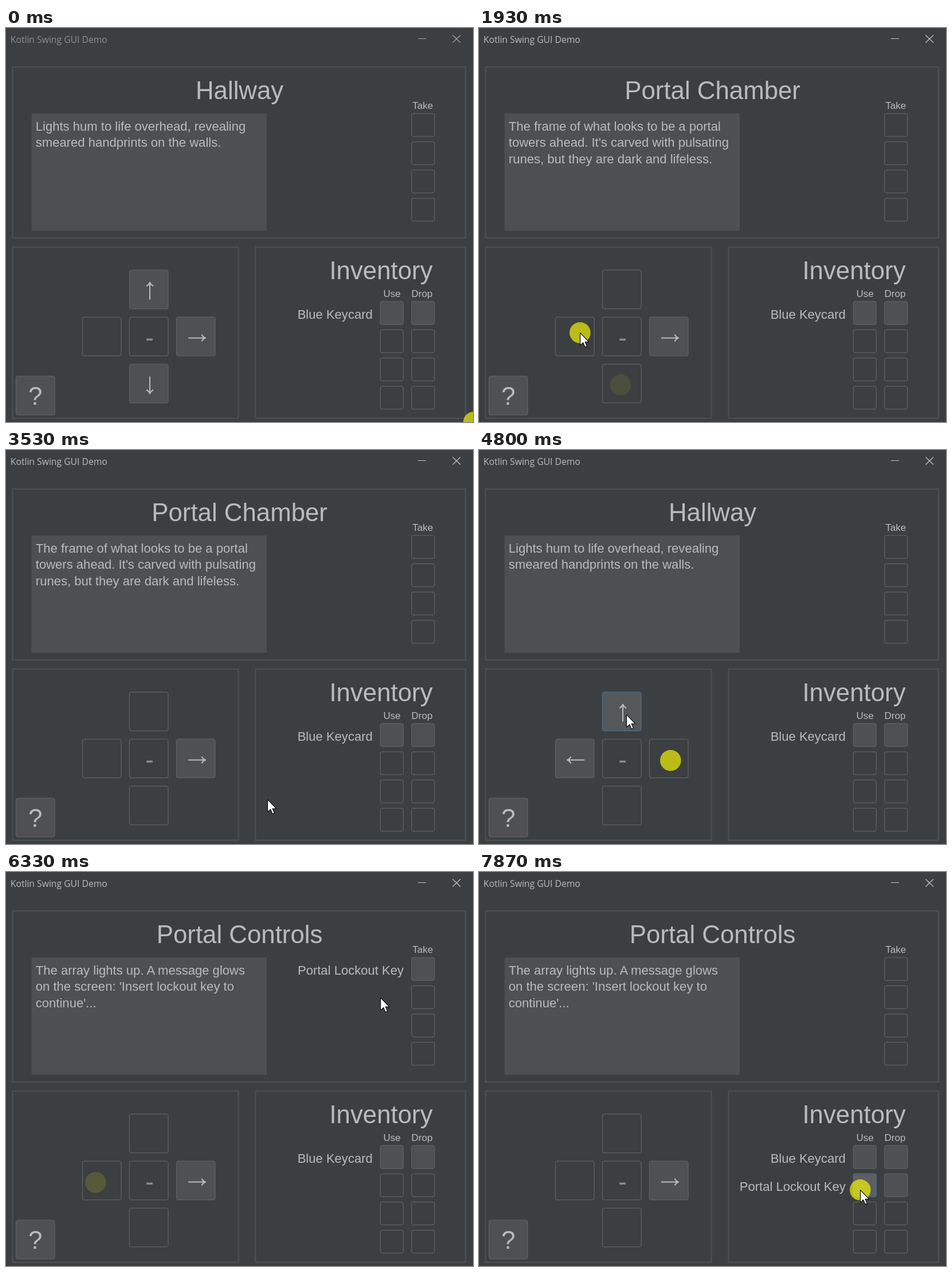
These frames come from a looping animation (815 px wide and 687 px high, 8000 ms). An HTML page:

```html
<!DOCTYPE html>
<html lang="en">
<head>
<meta charset="utf-8">
<title>Kotlin Swing GUI Demo</title>
<style>
html, body { margin: 0; width: 100%; height: 100%; overflow: hidden; background: #3c3f41; }
svg { display: block; font-family: "Liberation Sans", Arial, sans-serif; }
</style>
</head>
<body>
<svg id="stage" width="815" height="687" viewBox="0 0 815 687"></svg>
<script>
const LOOP = 8000, TICK = 1000 / 15;
const HOLD = 130, GLOW = 200, FADE = 340; // press, spot stays, spot fades
const BODY = 22.05, HEAD = 43.8, LABEL = 17;
const KEY = 'Portal Lockout Key';
const stage = document.getElementById('stage');

const room = (name, exits, ...lines) => ({ name, exits, lines });
const hallway = exits => room('Hallway', exits,
  'Lights hum to life overhead, revealing', 'smeared handprints on the walls.');
const chamber = room('Portal Chamber', 'r', 'The frame of what looks to be a portal',
  "towers ahead. It's carved with pulsating", 'runes, but they are dark and lifeless.');
const controls = room('Portal Controls', 'r', 'The array lights up. A message glows',
  "on the screen: 'Insert lockout key to", "continue'...");

// Each step glides the mouse to x, y, may press there, and may open a room on release.
// sway adds sine swings: [x size, x half waves, y size, y half waves].
const steps = [
  { start: -900, end: -300, x: 816, y: 687, press: -200, opens: hallway('urd') },
  { start: 70, end: 1230, x: 247, y: 622, sway: [0, 1, -40, 1], press: 1300, opens: hallway('ul') },
  { start: 1430, end: 1750, x: 176, y: 531, press: 1800, opens: chamber },
  { start: 2070, end: 3330, x: 456, y: 609, sway: [-110, 3, 60, 2] },
  { start: 3530, end: 4330, x: 334, y: 541, sway: [240, 1, -30, 1], press: 4470, opens: hallway('ul') },
  { start: 4600, end: 4800, x: 257, y: 461, press: 4870, opens: hallway('urd') },
  { start: 5000, end: 5100, x: 257, y: 461, press: 5200, opens: hallway('lr') },
  { start: 5330, end: 5670, x: 156, y: 541, press: 5730, opens: controls },
  { start: 5860, end: 6470, x: 730, y: 169, press: 6670, takes: true },
  { start: 6800, end: 7360, x: 665, y: 554, sway: [-14, 1, 0, 1], press: 7870 }
];
const presses = steps.filter(s => s.press !== undefined);
const focusTime = presses[1].press;
const takeTime = steps.find(s => s.takes).press + HOLD;

function mouseAt(t) {
  const i = steps.findLastIndex(s => s.start <= t);
  const b = steps[i], a = steps[i - 1] || b;
  const u = Math.min(1, (t - b.start) / (b.end - b.start)), ease = u * u * (3 - 2 * u);
  const [sx, nx, sy, ny] = b.sway || [0, 1, 0, 1];
  return {
    x: a.x + (b.x - a.x) * ease + sx * Math.sin(Math.PI * nx * u),
    y: a.y + (b.y - a.y) * ease + sy * Math.sin(Math.PI * ny * u)
  };
}

const text = (s, x, y, size, anchor = 'middle', fill = '#bbb', extra = '') =>
  `<text x="${x}" y="${y}" font-size="${size}" text-anchor="${anchor}" fill="${fill}" ${extra}>${s}</text>`;

const panel = (x, y, w, h) =>
  `<rect x="${x}" y="${y}" width="${w}" height="${h}" fill="none" stroke="#4c4f51" stroke-width="2.4"/>`;

const arrow = (x, y, turn) =>
  `<path transform="translate(${x} ${y}) rotate(${turn})" d="M-15 0H14M8.5-6Q11-1 15.5 0Q11 1 8.5 6"
    fill="none" stroke="#bbb" stroke-width="2"/>`;

const cursor = ({ x, y }) =>
  `<path transform="translate(${x} ${y}) scale(1.36)" fill="#fff" stroke="#000" stroke-width=".8"
    stroke-linejoin="round" d="M.4.4V16.4L4.1 12.9 6.6 18.8 9.2 17.7 6.7 11.9H11.5Z"/>`;

// The spot left by a press; a new press at the same place takes over.
function spot(step, i, t) {
  const { press, x, y } = step, next = presses[i + 1];
  const left = press + HOLD + GLOW + FADE - t;
  if (t < press || left <= 0) return '';
  if (next && next.press <= t && next.x === x && next.y === y) return '';
  return `<circle cx="${x + .3}" cy="${y + .3}" r="18.3" fill="#ff0" opacity="${.65 * Math.min(1, left / FADE)}"/>`;
}

function scene(t) {
  const mouse = mouseAt(t);
  const { name, exits, lines } = steps.findLast(s => s.opens && s.press + HOLD <= t).opens;
  const pressed = presses.some(s => s.press <= t && t < s.press + HOLD);
  const focused = t >= focusTime, taken = t >= takeTime;
  const onFloor = name === controls.name && !taken;
  const items = taken ? ['Blue Keycard', KEY] : ['Blue Keycard'];

  function button(x, y, size, on) {
    const hover = on && mouse.x >= x && mouse.x < x + size && mouse.y >= y && mouse.y < y + size;
    const fill = !on ? '#3c3f41' : !hover ? '#4e5052' : pressed ? '#5d5f62' : '#55585a';
    return `<rect x="${x + .5}" y="${y + .5}" width="${size - 1}" height="${size - 1}" rx="3.5"
      fill="${fill}" stroke="${hover ? '#466d94' : '#5e6062'}" stroke-width="1.3"/>`;
  }
  const big = (x, y, on) => button(x, y, 68.5, on);
  const small = (x, y, on) => button(x, y, 41, on);

  // window
  let s = '<rect width="815" height="687" fill="#3c3f41"/>' +
    text('Kotlin Swing GUI Demo', 7.8, 25.5, 15.7, 'start', focused ? '#bbb' : '#8c8f90',
      'font-family="Open Sans, sans-serif"') +
    `<path d="M719 18.5h14M779.5 12.5l13.5 13M793 12.5l-13.5 13" fill="none"
      stroke="${focused ? '#c4c4c4' : '#a0a2a3'}" stroke-width="1.2"/>` +
    panel(11.5, 68, 790.5, 298) + panel(11.5, 382, 394, 298.5) + panel(435.5, 382, 366.5, 298.5);

  // room
  s += text(name, 407.6, 124, HEAD) + text('Take', 727.3, 141, LABEL) +
    '<rect x="44.5" y="149" width="410.5" height="204.5" fill="#4c5052"/>';
  lines.forEach((line, i) => s += text(line, 51.8, Math.round(179 + 28.4 * i), BODY, 'start'));
  if (onFloor) s += text(KEY, 694, 179, BODY, 'end');

  // navigation: right, down, left, up around the middle
  [...'rdlu'].forEach((dir, i) => {
    const angle = i * Math.PI / 2, on = exits.includes(dir);
    const dx = 82 * Math.round(Math.cos(angle)), dy = 82 * Math.round(Math.sin(angle));
    s += big(215 + dx, 503.7 + dy, on);
    if (on) s += arrow(251 + dx, 540.5 + dy, 90 * i);
  });
  s += big(215, 503.7, false) + text('-', 250.6, 555, HEAD, 'middle', '#8c8c8c') +
    big(17, 606.7, true) + text('?', 51.3, 656.5, HEAD);

  // inventory
  s += text('Inventory', 654.5, 438, HEAD) + text('Use', 673.6, 469, LABEL) + text('Drop', 726, 469, LABEL);
  for (let i = 0; i < 4; i++) {
    const dy = 49.2 * i, owned = i < items.length;
    s += small(707.3, 148.7 + dy, onFloor && i === 0) +
      small(652.8, 476.5 + dy, owned) + small(707.3, 476.5 + dy, owned);
    if (owned) s += text(items[i], 639.8, Math.round(507 + dy), BODY, 'end');
  }

  return s + presses.map((p, i) => spot(p, i, t)).join('') + cursor(mouse);
}

let shown = -1;
function draw() {
  const now = performance.now() % LOOP;
  const t = Math.round(Math.floor((now + 6) / TICK) * TICK / 10) * 10 % LOOP;
  if (t !== shown) stage.innerHTML = scene(shown = t);
  requestAnimationFrame(draw);
}
draw();
</script>
</body>
</html>
```
